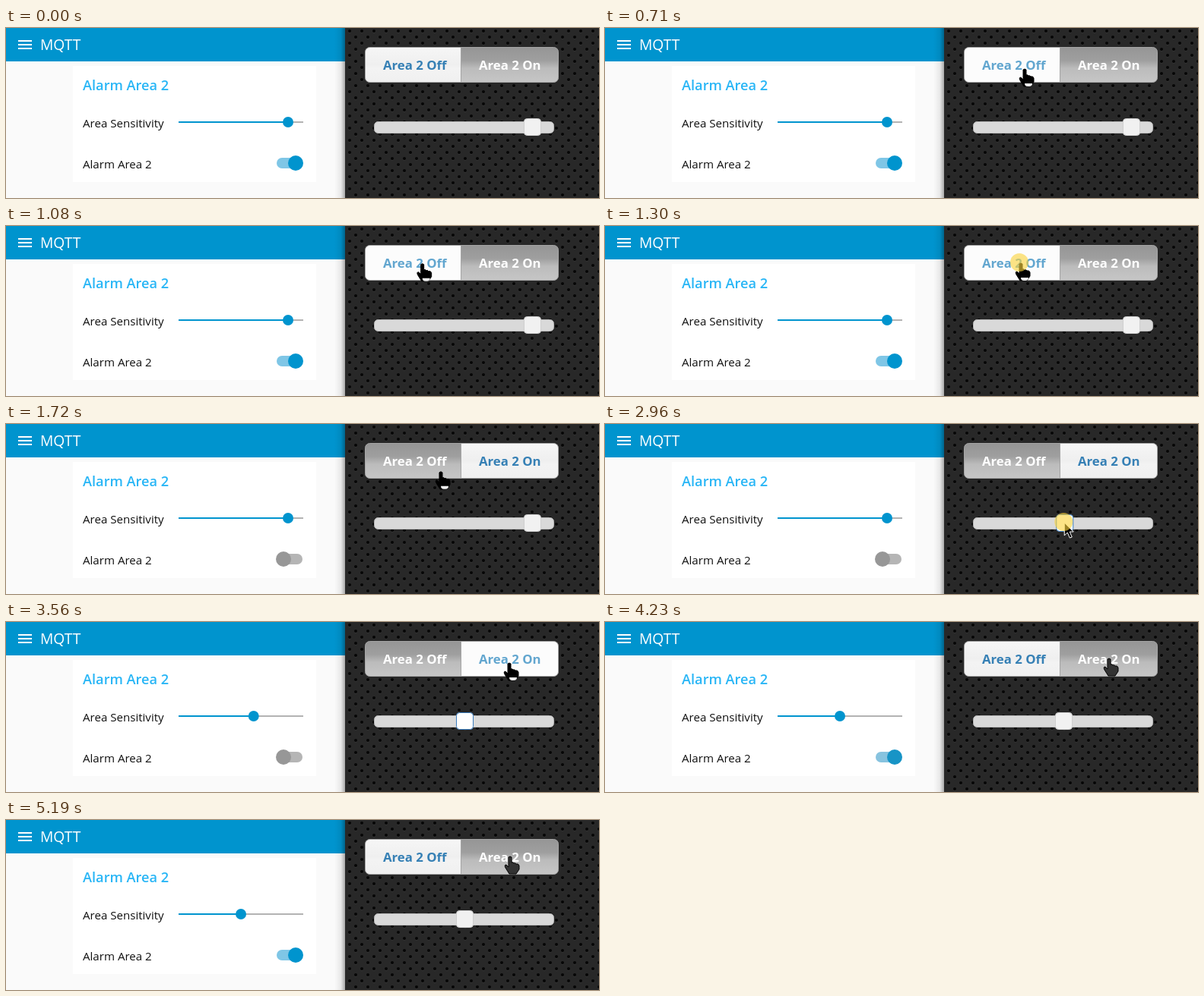
An HTML page with a canvas that plays this animation: 780 by 224 pixels, repeating every 5250 ms.

```html
<!DOCTYPE html>
<html lang="en">
<head>
<meta charset="utf-8">
<title>MQTT alarm panel</title>
<style>
html, body { margin: 0; width: 100%; height: 100%; overflow: hidden; }
canvas { display: block; }
</style>
</head>
<body>
<canvas id="stage" width="780" height="224"></canvas>
<script>
const ctx = document.getElementById('stage').getContext('2d');
const LOOP = 5250;
const SPLIT = 446;
const BLUE = '#0094ce';
const HAND = new Path2D('M-1 1Q1-1 3 1V8Q5 7 6 9Q8 8 9 10Q12 9 13 12V17L9 23H0L-5 15Q-7 11-4 11L-1 14Z');
const ARROW = new Path2D('M0 0V17L4 13L7 20L10 19L7 12H12Z');

// Pointer tip: time, x, y
const POINTER = [
  [180, 600, 230], [630, 551, 54], [850, 551, 54], [1150, 546, 49], [1550, 546, 49],
  [2200, 692, 130], [2450, 692, 130], [3000, 603, 130], [3120, 603, 130],
  [3480, 661, 54], [3600, 661, 54], [3820, 662, 48], [LOOP, 662, 48]
];
const PRESSES = [[1240, 1480], [2420, 3060], [3860, 4060]];

const clamp = v => Math.min(1, Math.max(0, v));
const span = (t, a, b) => clamp((t - a) / (b - a));
const ease = p => p * p * (3 - 2 * p);
const mix = (a, b, p) => a + (b - a) * p;
const mixColor = (a, b, p) => `rgb(${a.map((v, i) => Math.round(mix(v, b[i], p)))})`;
const switchAt = t => 1 - ease(span(t, 1560, 1720)) + ease(span(t, 4110, 4270));

function pointerAt(t) {
  const i = POINTER.findIndex(k => k[0] > t);
  if (i < 1) return null;
  const [t0, x0, y0] = POINTER[i - 1], [t1, x1, y1] = POINTER[i];
  const p = ease(span(t, t0, t1));
  return { x: mix(x0, x1, p), y: mix(y0, y1, p) };
}

function rect(x, y, w, h, fill) {
  ctx.fillStyle = fill;
  ctx.fillRect(x, y, w, h);
}

function round(x, y, w, h, r, fill, stroke) {
  ctx.beginPath();
  ctx.roundRect(x, y, w, h, r);
  ctx.fillStyle = fill;
  ctx.fill();
  if (stroke) {
    ctx.strokeStyle = stroke;
    ctx.lineWidth = 1;
    ctx.stroke();
  }
}

function disc(x, y, r, fill) {
  ctx.beginPath();
  ctx.arc(x, y, r, 0, 7);
  ctx.fillStyle = fill;
  ctx.fill();
}

function text(str, x, y, size, fill, weight = 400) {
  ctx.font = `${weight} ${size}px "Open Sans", sans-serif`;
  ctx.fillStyle = fill;
  ctx.fillText(str, x, y);
}

function gradient(x0, y0, x1, y1, stops) {
  const g = ctx.createLinearGradient(x0, y0, x1, y1);
  stops.forEach(([at, color]) => g.addColorStop(at, color));
  return g;
}

function makeMesh() {
  const tile = document.createElement('canvas');
  tile.width = tile.height = 16;
  const c = tile.getContext('2d');
  c.fillStyle = '#282828';
  c.fillRect(0, 0, 16, 16);
  for (const [x, y] of [[4, 4], [12, 12]]) {
    for (const [dy, color] of [[1, '#343434'], [0, '#050505']]) {
      c.beginPath();
      c.arc(x, y + dy, 2, 0, 7);
      c.fillStyle = color;
      c.fill();
    }
  }
  return ctx.createPattern(tile, 'repeat');
}
const mesh = makeMesh();

function drawApp(t, level) {
  rect(0, 0, SPLIT, 224, '#fafafa');
  rect(88, 50, 320, 153, '#fff');
  rect(0, 0, SPLIT, 44, BLUE);
  for (const y of [16, 21, 26]) rect(16, y, 18, 2, '#fff');
  text('MQTT', 45, 29, 19.2, '#fff', 500);
  text('Alarm Area 2', 101, 82, 18.2, '#29b6f6', 600);
  text('Area Sensitivity', 101, 131, 15.1, '#111');
  text('Alarm Area 2', 101, 185, 15.1, '#111');

  rect(227, 123, 164, 2, '#b3b3b3');
  rect(227, 123, level - 227, 2, BLUE);
  disc(level, 124, 7, BLUE);

  // The thumb arrives a little before its colour settles
  const tint = switchAt(t);
  round(356, 171, 34, 14, 7, mixColor([181, 181, 181], [127, 198, 230], tint));
  disc(mix(365, 381, switchAt(t + 40)), 178, 10, mixColor([151, 151, 151], [0, 148, 206], tint));

  rect(SPLIT - 14, 0, 14, 224, gradient(SPLIT - 14, 0, SPLIT, 0, [
    [0, 'rgba(0,0,0,0)'], [.6, 'rgba(0,0,0,.07)'], [1, 'rgba(0,0,0,.32)']]));
}

function drawButton(label, x, w, radii, active, hover) {
  const fill = active
    ? gradient(0, 25, 0, 72, [[0, '#959595'], [.38, '#9f9f9f'], [.6, '#bcbcbc'], [1, '#c6c6c6']])
    : hover ? '#fcfcfc'
    : gradient(0, 25, 0, 72, [[0, '#f6f6f6'], [.5, '#efefef'], [.6, '#f3f3f3'], [1, '#f0f0f0']]);
  round(x + .5, 25.5, w - 1, 46, radii, fill, '#a5a5a5');
  text(label, x + 24, 55, 16.8, active ? '#fff' : hover ? '#62a6cf' : '#3680b5', 700);
}

function drawPanel(t, pointer, knob) {
  rect(SPLIT, 0, 780 - SPLIT, 224, mesh);
  const isOn = t < 1480 || t >= 4020;
  const overButtons = pointer && pointer.y < 72;
  drawButton('Area 2 Off', 472, 127, [6, 0, 0, 6], !isOn, overButtons && pointer.x < 599);
  drawButton('Area 2 On', 598, 129, [0, 6, 6, 0], isOn, overButtons && pointer.x >= 599);

  round(484.5, 123.5, 236, 15, 5, '#d9d9d9', '#b8b8b8');
  const focused = t > 2420 && t < 3860;
  const lit = focused || pointer && Math.hypot(pointer.x - knob, pointer.y - 130) < 13;
  round(knob - 10.5, 119.5, 22, 22, 4, lit ? '#fff' : '#f1f1f1', focused ? '#387bbe' : '#cfcfcf');
}

function drawPointer(t, { x, y }) {
  const hand = y < 72;
  const dimmed = hand && t > 4020;
  const shape = hand ? HAND : ARROW;
  ctx.save();
  ctx.translate(x, y);
  ctx.lineWidth = 1;
  ctx.fillStyle = dimmed ? '#333' : '#000';
  ctx.strokeStyle = hand ? '#000' : '#fff';
  ctx.fill(shape);
  ctx.stroke(shape);
  if (hand && !dimmed) round(1, 19, 10, 4, [0, 0, 4, 4], '#eee');
  ctx.restore();
  if (PRESSES.some(([a, b]) => t >= a && t < b)) disc(x - 1, y - 1, 12, 'rgba(250,212,60,.62)');
}

function draw(t) {
  const pointer = pointerAt(t);
  const knob = mix(692, 603, ease(span(t, 2450, 3000)));
  const level = mix(371, 309, span(t, 3130, 3720));
  drawApp(t, level);
  drawPanel(t, pointer, knob);
  if (pointer) drawPointer(t, pointer);
}

function tick() {
  draw(performance.now() % LOOP);
  requestAnimationFrame(tick);
}
tick();
</script>
</body>
</html>
```
